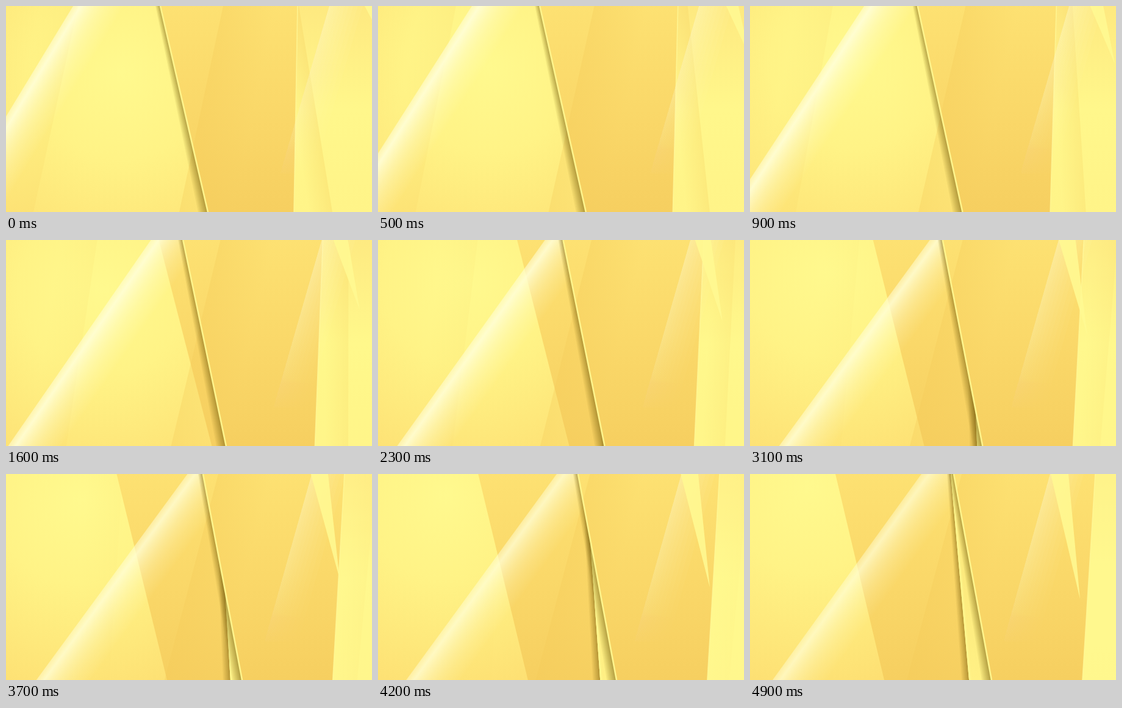
An HTML page with a canvas that plays this animation: 600x338 px, repeating every 5 s.

```html
<!DOCTYPE html>
<html lang="en">
<head>
<meta charset="utf-8">
<title>Golden panels</title>
<style>
html, body { margin: 0; width: 100%; height: 100%; overflow: hidden; background: #fdea80; }
canvas { display: block; width: 100%; height: 100%; }
</style>
</head>
<body>
<canvas id="stage" width="600" height="338"></canvas>
<script>
const W = 600, H = 338, LOOP = 5000, STEP = 100;
const ctx = document.getElementById('stage').getContext('2d');
const WHITE = '255,254,215', GOLD = '244,202,88', OLIVE = '118,98,18', LEMON = '255,250,146';

const rgba = (rgb, a) => `rgba(${rgb},${a})`;
const mix = (a, b, u) => a + (b - a) * u;

// Drift from a to b; bulge makes it run ahead and slow down, or swing back.
const drift = (u, a, b, bulge = 0) => mix(a, b, u + bulge * Math.sin(Math.PI * u));

// A slanted line, given by its x on the top and bottom rim.
const slant = (u, top, bottom, bulge) => [drift(u, ...top, bulge), drift(u, ...bottom, bulge)];

function fade(x0, y0, x1, y1, ...colors) {
  const g = ctx.createLinearGradient(x0, y0, x1, y1);
  colors.forEach((c, i) => g.addColorStop(i / (colors.length - 1), c));
  return g;
}

const down = (...colors) => fade(0, 0, 0, H, ...colors);

function trace(points) {
  ctx.beginPath();
  points.forEach(([x, y]) => ctx.lineTo(x, y));
  ctx.closePath();
}

function poly(points, fill) {
  trace(points);
  ctx.fillStyle = fill;
  ctx.fill();
}

const rightOf = ([a, b]) => [[a, 0], [W, 0], [W, H], [b, H]];

// Panel right of a line, with optional details clipped to it.
function panel(line, fill, details) {
  poly(rightOf(line), fill);
  if (!details) return;
  ctx.save();
  trace(rightOf(line));
  ctx.clip();
  details();
  ctx.restore();
}

// Soft strip beside a line; a negative width lies on the left.
function band([a, b], width, ...colors) {
  const len = Math.hypot(H, a - b), nx = H / len, ny = (a - b) / len;
  const dx = width / nx;
  poly([[a, 0], [a + dx, 0], [b + dx, H], [b, H]],
    fade(a, 0, a + nx * width, ny * width, ...colors));
}

// Stacked slices that spread from a line, widest ones faintest.
function fan([a, b], top, bottom, fill, slices = 10) {
  for (let i = 1; i <= slices; i++) {
    const k = (i / slices) ** 1.5;
    poly([[a, 0], [a + top * k, 0], [b + bottom * k, H], [b, H]], fill);
  }
}

function edge([a, b], color, width) {
  ctx.beginPath();
  ctx.moveTo(a, 0);
  ctx.lineTo(b, H);
  ctx.strokeStyle = color;
  ctx.lineWidth = width;
  ctx.stroke();
}

function draw(u) {
  const ridge = slant(u, [253, 334], [331, 396], 0.155);
  const fold = slant(u, [406, 329], [395, 359]);
  const back = slant(u, [300, 140], [390, 220], -0.02);
  const beam = slant(u, [110, 281], [-95, 37], 0.49);
  const shade = slant(u, [356, 347], [284, 257], 0.2);
  const side = slant(u, [478, 566], [472, 545], 0.17);
  const glow = slant(u, [530, 492], [431, 398]);
  const crease = slant(u, [480, 605], [535, 575], 0.38);
  const veil = slant(u, [118, 215], [45, 210]);
  const shard = slant(u, [588, 493], [606, 522], 0.25);
  const tip = [drift(u, 625, 541, 0.25), drift(u, 70, 205)];

  const orange = down('#fde172', '#fad869', '#f6cf60');
  const shadeOver = () => band(shade, 85, rgba(GOLD, 0.32), rgba(GOLD, 0));

  const cx = mix(190, 100, u), cy = mix(110, 20, u);
  const light = ctx.createRadialGradient(cx, cy, 0, cx, cy, 350);
  light.addColorStop(0, '#fff98e');
  light.addColorStop(0.4, '#fff386');
  light.addColorStop(1, '#fdde71');
  ctx.fillStyle = light;
  ctx.fillRect(0, 0, W, H);
  band(veil, -60, rgba(GOLD, 0.14 * (1 - u)), rgba(GOLD, 0));

  panel(back, orange);
  shadeOver();
  const lit = mix(0.92, 0.72, u * u);
  const glare = [0.6, 1, 0.72, 0.5, 0.33, 0.2, 0.1, 0].map(a => rgba(WHITE, a * lit));
  band(beam, 72, ...glare);

  fan(fold, -6, -12, rgba(OLIVE, 0.075));
  panel(fold, down('#fae477', '#fff084'));
  band(fold, 5, rgba(LEMON, 0.9), rgba(LEMON, 0));

  fan(ridge, -8, -16, rgba(OLIVE, 0.085));
  panel(ridge, orange, shadeOver);
  edge(ridge, '#fff48c', 2.6);

  panel(side, down('#fee980', '#fff78b', '#fff488'), () => {
    poly(rightOf(side), rgba(LEMON, 0.6 * u * u));
    band(crease, -38, rgba(GOLD, 0.28 * (1 - u)), rgba(GOLD, 0));
  });
  edge(side, 'rgba(255,248,150,.8)', 1.6);

  fan(glow, 55, 55, fade(0, 0, 0, 290, rgba(WHITE, 0.05), rgba(WHITE, 0.03), rgba(WHITE, 0)));
  poly([[shard[0], 0], [shard[1], 0], tip], rgba(LEMON, 0.88));
}

function frame(now) {
  const t = Math.floor(now % LOOP / STEP) * STEP;
  draw(t / (LOOP - STEP));
  requestAnimationFrame(frame);
}
draw(0);
requestAnimationFrame(frame);
</script>
</body>
</html>
```
